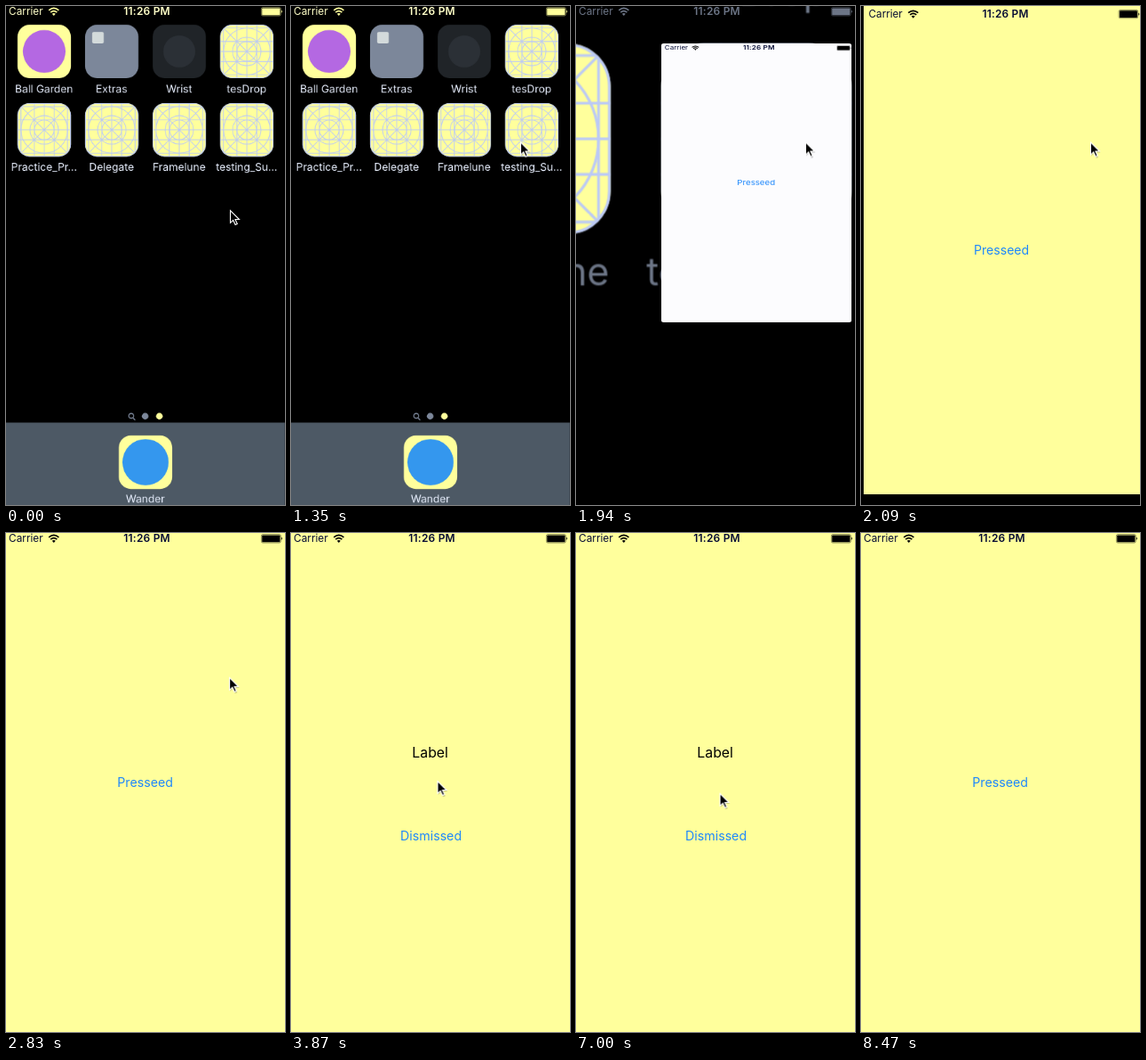
These frames come from a looping animation (314 by 560 pixels, 8770 ms). An HTML page:

```html
<!DOCTYPE html>
<html lang="en">
<head>
<meta charset="utf-8">
<title>Phone screen</title>
<style>
html, body { margin: 0; width: 100%; height: 100%; overflow: hidden; background: #000; }
svg { display: block; width: 100%; height: 100%; font: 11.8px Inter, Roboto, sans-serif; }
.label { font-size: 12px; }
.mid { text-anchor: middle; }
.time { font-size: 12px; font-weight: 600; letter-spacing: .2px; }
.button { font-size: 14.2px; fill: #1f88fb; }
.grid { fill: none; stroke: #bccaf6; stroke-width: .85; }
</style>
</head>
<body>
<svg id="stage" viewBox="0 0 314 560" preserveAspectRatio="none">
  <defs>
    <clipPath id="round"><rect width="60" height="60" rx="13.5"/></clipPath>
    <g id="template">
      <rect width="60" height="60" rx="13.5" fill="#ffff9c"/>
      <g class="grid" clip-path="url(#round)">
        <path d="M0 0L60 60M60 0L0 60M0 3.8H60M0 18.8H60M0 30H60M0 41.2H60M0 56.2H60M3.8 0V60M18.8 0V60M30 0V60M41.2 0V60M56.2 0V60"/>
        <circle cx="30" cy="30" r="11"/>
        <circle cx="30" cy="30" r="16"/>
        <circle cx="30" cy="30" r="26.2"/>
      </g>
      <rect class="grid" x=".4" y=".4" width="59.2" height="59.2" rx="13.1"/>
    </g>
    <g id="statusBar">
      <text x="3.1" y="10.4">Carrier</text>
      <text x="158.6" y="10.4" class="mid time">11:26 PM</text>
      <g fill="currentColor">
        <path d="M48.2 4.9Q53.8 -.1 59.4 4.9M50.2 7.1Q53.8 4 57.4 7.1" fill="none" stroke="currentColor" stroke-width="1.7"/>
        <path d="M51.8 8.7Q53.8 7.2 55.8 8.7L53.8 11Z"/>
        <rect x="287.4" y="1.6" width="21.8" height="9.4" rx="1.6" fill="none" stroke="currentColor" stroke-width=".8" opacity=".55"/>
        <rect x="288.2" y="2.4" width="20.2" height="7.8" rx=".8"/>
        <path d="M309.8 4.6Q311.8 6.3 309.8 8Z"/>
      </g>
    </g>
  </defs>

  <g id="home">
    <g id="icons"></g>
    <g id="labels"></g>
    <rect id="press" x="241" y="109" width="60" height="60" rx="13.5" opacity="0"/>
  </g>
  <g id="homeStatus"><use href="#statusBar"/></g>

  <g id="app">
    <rect id="paper" width="314" height="560" rx="0" fill="#ffff9c"/>
    <g id="appStatus" fill="#060c34" color="#000"><use href="#statusBar"/></g>
    <text id="first" class="button mid" x="156.6" y="285.2">Presseed</text>
    <g id="second">
      <text class="mid" x="156.6" y="252" font-size="15.8">Label</text>
      <text class="button mid" x="157.6" y="345.2">Dismissed</text>
    </g>
  </g>

  <g id="cursor">
    <path d="M1.2 1.8V15.8L4.4 12.8L6.8 18.2L9.2 17.2L6.8 12H11.6Z" opacity=".22"/>
    <path d="M.5 .5V14.3L3.7 11.4L6.1 16.6L8.3 15.6L6 10.5H10.5Z" stroke="#fff" stroke-width="1.1"/>
  </g>
</svg>

<script>
const LOOP = 8770;
const byId = id => document.getElementById(id);

function add(parent, tag, attrs, text = "") {
  const node = document.createElementNS("http://www.w3.org/2000/svg", tag);
  for (const key in attrs) node.setAttribute(key, attrs[key]);
  node.textContent = text;
  byId(parent).append(node);
}

const tile = (x, y, fill) => add("icons", "rect", { x, y, width: 60, height: 60, rx: 13.5, fill });
const disc = (cx, cy, r, fill) => add("icons", "circle", { cx, cy, r, fill });
const label = (x, y, text) => add("labels", "text", { x, y, class: "label mid" }, text);

// Home screen
add("icons", "rect", { y: 467.5, width: 314, height: 93, fill: "#4d5965" });
const rows = [
  ["Ball Garden", "Extras", "Wrist", "tesDrop"],
  ["Practice_Pr…", "Delegate", "Framelune", "testing_Su…"]
];
const tiles = ["#ffff9c", "#7c879a", "#202428"];
rows.forEach((row, r) => row.forEach((name, c) => {
  const x = 13 + 76 * c, y = 21 + 88 * r;
  if (r === 0 && c < 3) tile(x, y, tiles[c]);
  else add("icons", "use", { href: "#template", x, y });
  label(x + 29.8, y + 76.2, name);
}));
disc(43, 51, 24, "#b468e2");
add("icons", "rect", { x: 97, y: 29, width: 13, height: 13, rx: 2, fill: "#d3dadb" });
disc(195, 51, 18, "#2b3036");
tile(127, 482, "#ffff9c");
disc(157, 512, 26, "#3497ee");
label(156.8, 557.6, "Wander");
disc(156.6, 460.3, 3.7, "#7c879a");
disc(172.6, 460.3, 3.7, "#ffff9c");
add("icons", "path", {
  d: "M143 462.4L145.4 464.6M143.6 460A2.7 2.7 0 1 1 138.2 460A2.7 2.7 0 1 1 143.6 460",
  fill: "none", stroke: "#7c879a", "stroke-width": 1.3
});

// Every value holds until the next step.
function play(id, prop, steps) {
  const frames = steps.map(([time, value]) => ({ offset: time / LOOP, [prop]: value, easing: "steps(1)" }));
  frames.push({ offset: 1, [prop]: steps.at(-1)[1] });
  byId(id).animate(frames, { duration: LOOP, iterations: Infinity });
}

const move = (x, y) => `translate(${x}px, ${y}px)`;
const matrix = (sx, sy, x, y) => `matrix(${sx}, 0, 0, ${sy}, ${x}, ${y})`;

// Cursor strokes: start, end, number of steps, destination
const strokes = [
  [150, 600, 4, 254, 210],
  [900, 1350, 4, 258, 152.5],
  [2690, 3420, 6, 164.5, 278],
  [4470, 5070, 5, 158, 332],
  [5820, 6410, 5, 161, 286],
  [7000, 7590, 5, 166, 342],
  [8040, 8330, 3, 297, 545]
];
let [px, py] = [252, 229];
const path = [[0, move(px, py)]];
for (const [start, end, count, x, y] of strokes) {
  for (let k = 1; k <= count; k++) {
    const u = k / count, e = u * u * (3 - 2 * u);
    path.push([start + (end - start) * (k - 1) / (count - 1), move(px + (x - px) * e, py + (y - py) * e)]);
  }
  [px, py] = [x, y];
}
path.push([8470, move(400, 700)]);
play("cursor", "transform", path);

// Launch: the home screen zooms until the tapped icon meets the app window.
const zoom = 214 / 60;
const dimmed = "#6c7586";
play("press", "opacity", [[0, 0], [1790, .45], [1940, 0]]);
play("home", "transform", [[0, matrix(1, 1, 0, 0)], [1940, matrix(zoom, zoom, 96 - 241 * zoom, 42 - 109 * zoom)]]);
play("labels", "fill", [[0, "#e9f0ff"], [1940, dimmed]]);
play("homeStatus", "fill", [[0, "#ffffc8"], [1940, dimmed]]);
play("homeStatus", "color", [[0, "#ffff9c"], [1940, dimmed]]);
for (const id of ["home", "homeStatus"]) play(id, "opacity", [[0, 1], [2090, 0]]);

play("app", "opacity", [[0, 0], [1940, 1]]);
play("app", "transform", [
  [0, matrix(1, 1, 0, 0)],
  [1940, matrix(214 / 314, 313 / 560, 96, 42)],
  [2090, matrix(311 / 314, 548 / 560, 3, 0)],
  [2240, matrix(1, 1, 0, 0)]
]);
play("paper", "fill", [[0, "#fcfcfe"], [2090, "#ffff9c"]]);
play("paper", "rx", [[0, "4px"], [2090, "0px"]]);
play("appStatus", "transform", [[0, move(2.5, 3)], [2390, move(0, 0)]]);

// The two app screens
play("first", "opacity", [[0, 1], [3420, .35], [3570, 1], [3870, 0], [5370, 1], [6700, 0], [7890, 1]]);
play("second", "opacity", [[0, 0], [3870, 1], [5370, 0], [6700, 1], [7890, 0]]);
</script>
</body>
</html>
```
